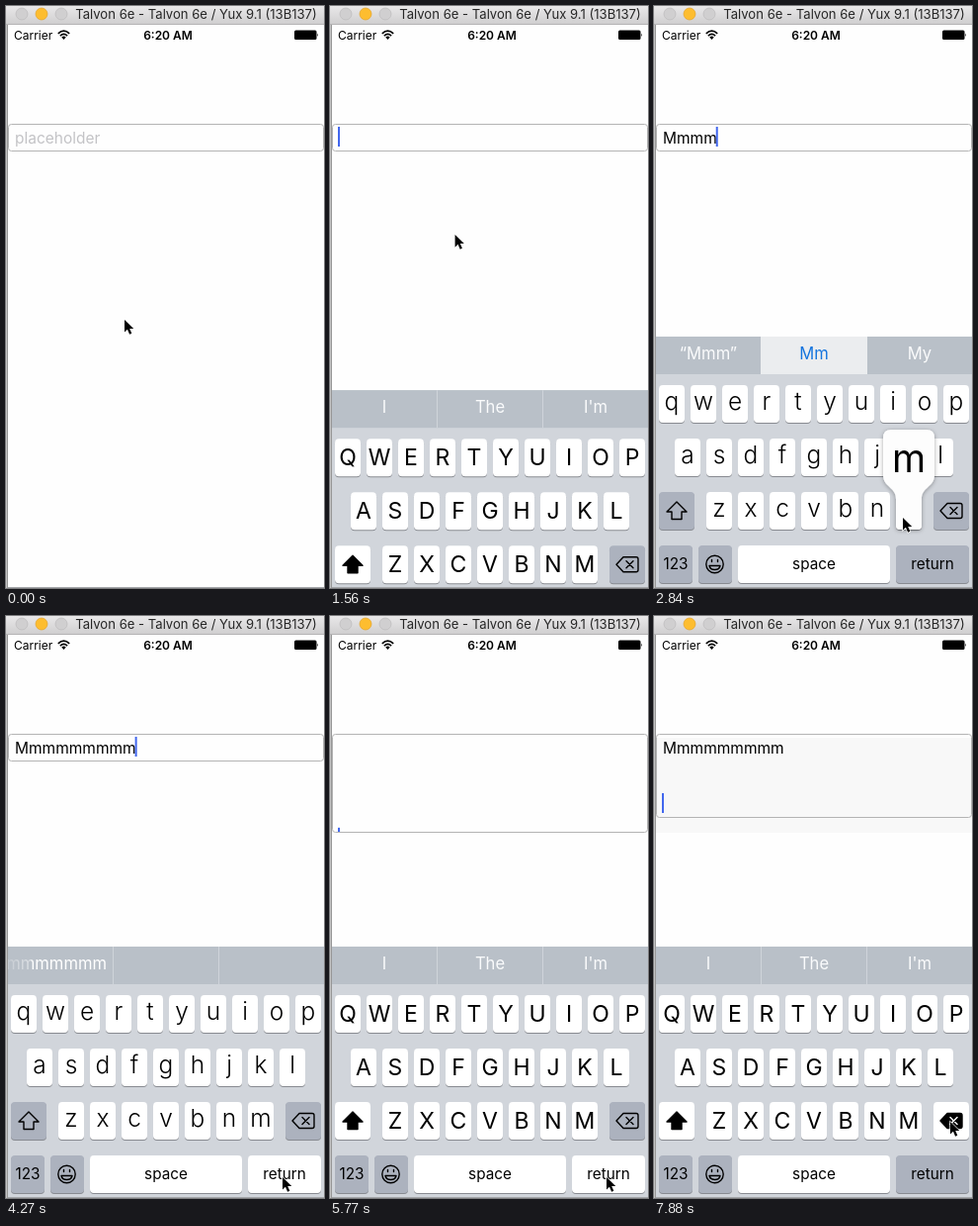
An HTML page for the animation above (8 s loop, 322 by 588 pixels).

```html
<!DOCTYPE html>
<html lang="en">
<head>
<meta charset="utf-8">
<title>Growing text field</title>
<style>
  html, body { margin: 0; width: 100%; height: 100%; overflow: hidden; background: #fefefe; }
  svg { display: block; width: 100vw; height: 100vh; }
  text { font-family: Inter, Roboto, "Liberation Sans", sans-serif; fill: #000; }
  .mid { text-anchor: middle; }
  .key { fill: #fff; }
  .dark { fill: #acb2be; }
  .edge { fill: #888b91; }
  .hint { font-size: 16.6px; fill: #fafbfc; }
  .cap { font-size: 23px; }
  .low { font-size: 24.5px; font-weight: 300; }
  .word { font-size: 15.3px; }
  .field { font-size: 15.5px; }
  .line { fill: none; stroke: #000; stroke-width: 1.4; stroke-linejoin: round; stroke-linecap: round; }
</style>
</head>
<body>
<svg viewBox="0 0 322 588">
  <defs>
    <linearGradient id="bar" x2="0" y2="1">
      <stop stop-color="#e9e8e9"/><stop offset="1" stop-color="#d0cfd0"/>
    </linearGradient>
    <linearGradient id="fade" gradientUnits="userSpaceOnUse" x1="2" x2="30">
      <stop stop-color="#fff" stop-opacity=".2"/><stop offset=".8" stop-color="#fff" stop-opacity=".5"/>
      <stop offset=".9" stop-color="#fff"/>
    </linearGradient>
    <filter id="soft" x="-30%" y="-30%" width="160%" height="160%">
      <feDropShadow dx="0" dy="1" stdDeviation="2" flood-opacity=".35"/>
    </filter>
    <clipPath id="inside"><rect id="hole" x="2" y="120" width="320" height="26"/></clipPath>
    <clipPath id="cell"><rect x="2" y="334" width="106" height="38"/></clipPath>
  </defs>

  <rect width="322" height="588" fill="#fefefe"/>

  <!-- text field -->
  <rect id="tint" x="2" y="123" width="320" height="96" fill="#f8f8f8"/>
  <rect id="frame" x="2.5" y="119.5" width="319" height="27" rx="3" fill="none" stroke="#b4b4b4"/>
  <g clip-path="url(#inside)">
    <text id="ghost" class="field" x="9" y="138.5" style="fill:#c3c3c6">placeholder</text>
    <text id="typed" class="field" x="9" y="138.5"></text>
    <rect id="caret" width="2" height="20" fill="#4267ee"/>
  </g>

  <!-- keyboard -->
  <g id="board">
    <rect x="2" y="334" width="320" height="254" fill="#d1d5db"/>
    <rect x="2" y="334" width="320" height="38" fill="#b9c0c8"/>
    <path d="M108.5 334v38M215.5 334v38" stroke="#cfd4da"/>
    <rect id="pick" x="108" y="334" width="108" height="38" fill="#ebedef"/>
    <g id="hints">
      <text class="hint mid" x="55" y="357"></text>
      <text class="hint mid" x="162" y="357"></text>
      <text class="hint mid" x="269" y="357"></text>
    </g>
    <g clip-path="url(#cell)">
      <text id="long" class="hint" x="102" y="357" text-anchor="end" style="fill:url(#fade)">Mmmmmmmmm</text>
    </g>
    <g id="keys"></g>
    <path id="shift" class="line" d="M23 501L33 511H28V518.500H18V511H13Z"/>
    <path id="back" class="line" d="M290 510L297 502.500H310Q312 502.500 312 504.500V515.500Q312 517.500 310 517.500H297Z"/>
    <path id="cross" class="line" d="M300 506.500l7 7m0-7l-7 7"/>
    <g class="line">
      <circle cx="61.500" cy="564" r="8.700"/>
      <path d="M56 565.500H67A5.600 5 0 0 1 56 565.500ZM58.500 559.500v2m6-2v2"/>
    </g>
    <g id="pop">
      <path fill="#fdfdfd" filter="url(#soft)" d="M240 428H276Q284 428 284 436V474C284 486 271 486 271 498V525Q271 529 267 529H249Q245 529 245 525V498C245 486 232 486 232 474V436Q232 428 240 428Z"/>
      <text id="big" class="mid" x="258" y="471" font-size="39"></text>
    </g>
  </g>

  <!-- window -->
  <rect width="1" height="570" y="18" fill="#c4c4c4"/>
  <rect x="1" width="1" height="570" y="18" fill="#979797"/>
  <rect x="2" y="587" width="320" height="1" fill="#a4a6a9"/>
  <rect width="322" height="18" fill="url(#bar)"/>
  <rect y="18" width="322" height="1" fill="#b5b4b5"/>
  <g stroke-width=".7" fill="#d0cfd0" stroke="#bcbbbc">
    <circle cx="16" cy="8" r="6"/>
    <circle cx="36" cy="8" r="6" fill="#fdbd2f" stroke="#e2a32a"/>
    <circle cx="56" cy="8" r="6"/>
  </g>
  <text class="mid" x="192.500" y="13" font-size="13.1" style="fill:#262626">Talvon 6e - Talvon 6e / Yux 9.1 (13B137)</text>
  <text x="8" y="33.500" font-size="12">Carrier</text>
  <g fill="none" stroke="#000" stroke-width="1.700">
    <path d="M52.800 27.800Q58.500 22.500 64.200 27.800M54.900 30.100Q58.500 26.800 62.100 30.100"/>
    <path d="M56.300 31.500Q58.500 29.700 60.700 31.500L58.500 34Z" fill="#000" stroke="none"/>
  </g>
  <text class="mid" x="164" y="33.500" font-size="12" font-weight="600">6:20 AM</text>
  <rect x="292" y="24.500" width="22.500" height="9.500" rx="1.500"/>
  <path d="M315.300 27.500q1.500 1.700 0 3.400z"/>

  <g id="mouse">
    <path transform="translate(1 1) scale(.87)" d="M0 0V14.500L3.400 11.300L5.900 17L8.400 15.900L6 10.400H10.600Z" stroke="#fff" stroke-width="1.500" paint-order="stroke"/>
  </g>
</svg>
<script>
const LOOP = 8000, LINE = 19, MAX_ROWS = 5;
const FOCUS = 1400, HOLD = 6870, ERASE = 7750;
const $ = id => document.getElementById(id);
const every = (n, start, gap) => Array.from({ length: n }, (_, i) => start + gap * i);
const set = (el, k, v) => el.setAttribute(k, v);
const show = (el, on) => set(el, 'visibility', on ? 'visible' : 'hidden');

function add(tag, attrs, label) {
  const el = document.createElementNS('http://www.w3.org/2000/svg', tag);
  for (const k in attrs) set(el, k, attrs[k]);
  if (label) el.textContent = label;
  $('keys').append(el);
  return el;
}

function key(x, y, w, cls) {
  add('rect', { x, y: y + 1, width: w, height: 38, rx: 4, class: 'edge' });
  return add('rect', { x, y, width: w, height: 38, rx: 4, class: cls });
}

const letters = [];
['QWERTYUIOP', 'ASDFGHJKL', 'ZXCVBNM'].forEach((row, r) => {
  const y = 383 + 54 * r;
  [...row].forEach((c, i) => {
    const x = 165 + 32 * (i - row.length / 2);
    key(x, y, 26, 'key');
    letters.push({ c, y, el: add('text', { x: x + 13, class: 'mid' }, c) });
  });
});

function wordKey(label, x, w, cls) {
  const el = key(x, 545, w, cls);
  add('text', { x: x + w / 2, y: 569, class: 'word mid' }, label);
  return el;
}
const shiftKey = key(5, 491, 36, 'dark');
const backKey = key(283, 491, 36, 'dark');
wordKey('123', 5, 34, 'dark');
wordKey('', 45, 34, 'dark');
wordKey('space', 85, 154, 'key');
const returnKey = wordKey('return', 245, 74, 'dark');

const strokes = every(9, 2220, 165);
const returns = every(6, 4330, 282);
const edits = [FOCUS, ...strokes, ...returns.flatMap(r => [r - 90, r]), 6570, 7000, ERASE];

// Each move bends towards a control point on its way to the end point.
const home = [119, 316];
const moves = [
  { from: 500, to: 1120, bend: [215, 180], end: [94, 128] },
  { from: 1440, to: 2000, bend: [233, 585], end: [251, 516] },
  { from: 3570, to: 4050, bend: [335, 590], end: [279, 566] },
  { from: 5830, to: 6390, bend: [292, 535], end: [299, 510] }
];

function ease(t, from, to) {
  const u = Math.min(1, Math.max(0, (t - from) / (to - from)));
  return u * u * (3 - 2 * u);
}

function mouseAt(t) {
  return moves.reduce((p, m) => {
    const u = ease(t, m.from, m.to), v = 1 - u;
    return p.map((a, i) => v * v * a + 2 * u * v * m.bend[i] + u * u * m.end[i]);
  }, home);
}

const passed = (times, t) => times.filter(s => s <= t).length;
const near = (times, t, before, after) => times.some(s => t >= s - before && t < s + after);

// Fully lit after each edit, then one fade out and back on.
function blink(t) {
  if (t < FOCUS) return 0;
  const age = t - Math.max(...edits.filter(e => e <= t));
  return 1 - ease(age, 420, 540) + ease(age, 860, 960);
}

function hintsAt(t) {
  if (t < strokes[0] + 70 || t >= returns[0]) return ['I', 'The', "I'm"];
  if (t >= 3620) return ['', '', ''];
  const n = Math.min(3, Math.max(1, passed(strokes, t - 200)));
  return [`“M${'m'.repeat(n - 1)}”`, n > 1 ? 'Mm' : 'Me', 'My'];
}

function drawField(t) {
  const shrink = 3 * ease(t, ERASE, ERASE + 120);
  const rows = 1 + returns.reduce((n, r) => n + ease(t, r, r + 120), 0) - shrink;
  const caretRow = passed(returns, t) - shrink;
  const scroll = LINE * Math.max(0, rows - MAX_ROWS);
  const height = Math.min(99, 27 + LINE * (rows - 1));
  const count = passed(strokes, t);

  set($('frame'), 'height', height);
  set($('hole'), 'height', height - 1);
  show($('tint'), t >= ERASE + 70);
  show($('ghost'), t < FOCUS - 60);
  $('typed').textContent = count ? 'M' + 'm'.repeat(count - 1) : '';
  set($('typed'), 'y', 138.5 - scroll);
  const inline = count && t < returns[0];
  set($('caret'), 'x', 8 + (inline ? $('typed').getComputedTextLength() : 0));
  set($('caret'), 'y', 122 + LINE * caretRow - scroll);
  set($('caret'), 'opacity', blink(t));
}

function drawBoard(t) {
  const rise = Math.min(1, Math.max(0, (t - FOCUS) / 400));
  set($('board'), 'transform', `translate(0 ${254 * (1 - rise) ** 3})`);

  const words = hintsAt(t), picked = words[1].startsWith('M');
  [...$('hints').children].forEach((el, i) => { el.textContent = words[i]; });
  show($('pick'), picked);
  $('hints').children[1].style.fill = picked ? '#1374de' : '';
  show($('long'), t >= 3830 && t < returns[0]);

  const upper = t < strokes[0] || t >= returns[0];
  for (const { c, y, el } of letters) {
    el.textContent = upper ? c : c.toLowerCase();
    set(el, 'class', upper ? 'cap mid' : 'low mid');
    set(el, 'y', y + (upper ? 27 : 25));
  }
  set(shiftKey, 'class', upper ? 'key' : 'dark');
  $('shift').style.fill = upper ? '#000' : 'none';
  set(returnKey, 'class', near(returns, t, 90, 40) ? 'key' : 'dark');

  const erasing = near([6570], t, 0, 120) || t >= HOLD;
  set(backKey, 'class', erasing ? 'key' : 'dark');
  $('back').style.fill = erasing ? '#000' : 'none';
  $('cross').style.stroke = erasing ? '#fff' : '#000';
  show($('pop'), near(strokes, t, 65, 35));
  $('big').textContent = upper ? 'M' : 'm';
}

function tick() {
  const t = performance.now() % LOOP;
  set($('mouse'), 'transform', `translate(${mouseAt(t)})`);
  drawField(t);
  drawBoard(t);
  requestAnimationFrame(tick);
}
tick();
</script>
</body>
</html>
```
